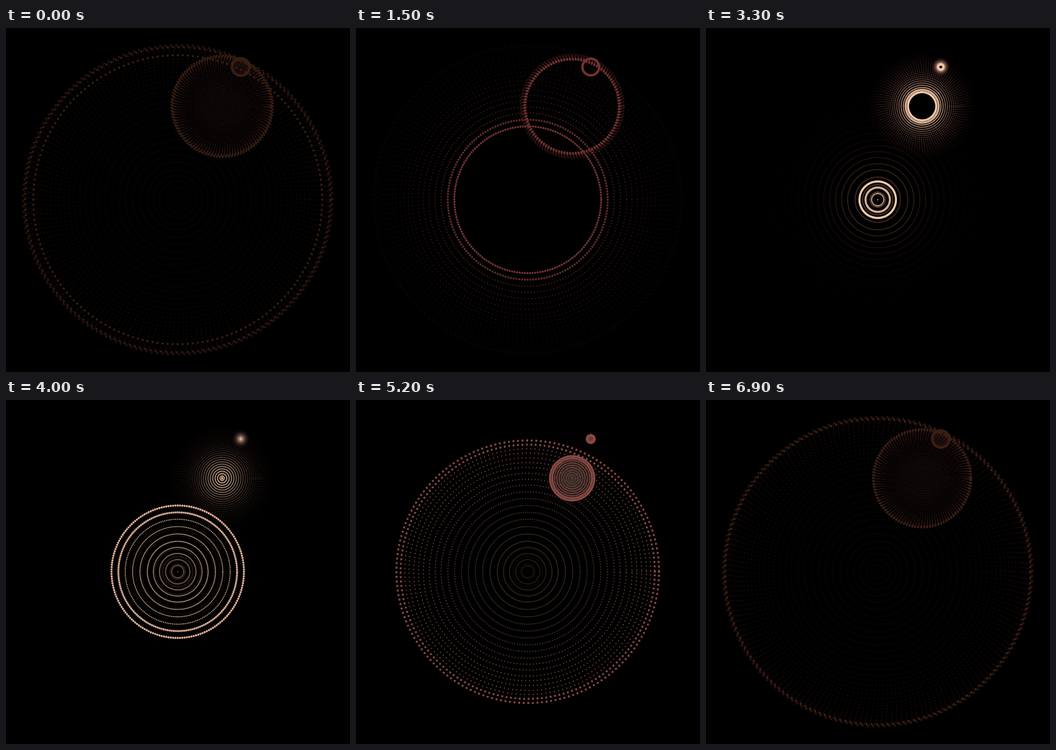
Animation of 600x600 px, one loop 7 s. Source, as an HTML page with a canvas:

```html
<!DOCTYPE html>
<html>
<head>
<meta charset="utf-8">
<style>
  html, body { margin: 0; width: 100%; height: 100%; overflow: hidden; background: #000; }
  canvas { display: block; }
</style>
</head>
<body>
<canvas id="stage" width="600" height="600"></canvas>
<script>
const ctx = document.getElementById('stage').getContext('2d');
const STEPS = 70, STEP_MS = 100, TRAIL = 42, FADE = 0.9;

// [step, radius] of the large ring
const radiusKeys = [
  [0, 252], [4, 230], [8, 201], [11, 172.5], [13, 151], [15, 128], [17, 104.5],
  [20, 73.5], [22, 52.5], [26, 0], [30, 0], [35, 53], [38, 91.5], [41, 127.5],
  [43, 151], [46, 182], [49, 207], [52, 229], [56, 251], [58, 258.5],
  [61, 267], [64, 271], [69, 266]
];
// [steps away from the brightest moment, r, g, b]
const colorKeys = [
  [0, 248, 212, 178], [2, 242, 200, 168], [10, 192, 125, 111],
  [20, 115, 50, 50], [23, 86, 35, 38], [35, 56, 31, 19]
];

function interpolate(keys, x) {
  let i = 1;
  while (i < keys.length - 1 && keys[i][0] < x) i++;
  const a = keys[i - 1], b = keys[i];
  const p = (x - a[0]) / (b[0] - a[0]);
  return a.slice(1).map((v, k) => v + (b[k + 1] - v) * p);
}

const largeRadius = n => interpolate(radiusKeys, n)[0];
const pulse = n => Math.sin(0.0465 * Math.max(38.9 - n, n - 42.6, 0));

const rings = [
  { x: 299.5, y: 299.5, dots: 180, spin: 0.0026, radius: largeRadius },
  { x: 377, y: 136.5, dots: 105, spin: 0.004, radius: n => 91 * pulse(n) },
  { x: 409.5, y: 68, dots: 60, spin: 0, radius: n => 16 * pulse(n) }
];

function drawRing(ring, n, size) {
  const r = ring.radius(n);
  const dot = angle => {
    const x = ring.x + r * Math.cos(angle), y = ring.y + r * Math.sin(angle);
    ctx.moveTo(x + size, y);
    ctx.arc(x, y, size, 0, 2 * Math.PI);
  };
  ctx.beginPath();
  dot(0);
  if (r > 0) {
    for (let i = 0; i < ring.dots; i++) dot(i * 2 * Math.PI / ring.dots + n * ring.spin);
  }
  ctx.fill();
}

function draw(step) {
  ctx.fillStyle = '#000';
  ctx.fillRect(0, 0, 600, 600);
  for (let age = TRAIL; age >= 0; age--) {
    const n = (step - age + STEPS) % STEPS;
    const color = interpolate(colorKeys, Math.abs(n - 35)).map(c => Math.round(c * FADE ** age));
    ctx.fillStyle = `rgb(${color})`;
    for (const ring of rings) drawRing(ring, n, age < 2 ? 1.9 : 1.1);
  }
}

let start, shown = -1;
function tick() {
  const now = performance.now();
  start ??= now;
  const step = Math.floor((now - start) / STEP_MS) % STEPS;
  if (step !== shown) draw(shown = step);
  requestAnimationFrame(tick);
}
tick();
</script>
</body>
</html>
```
